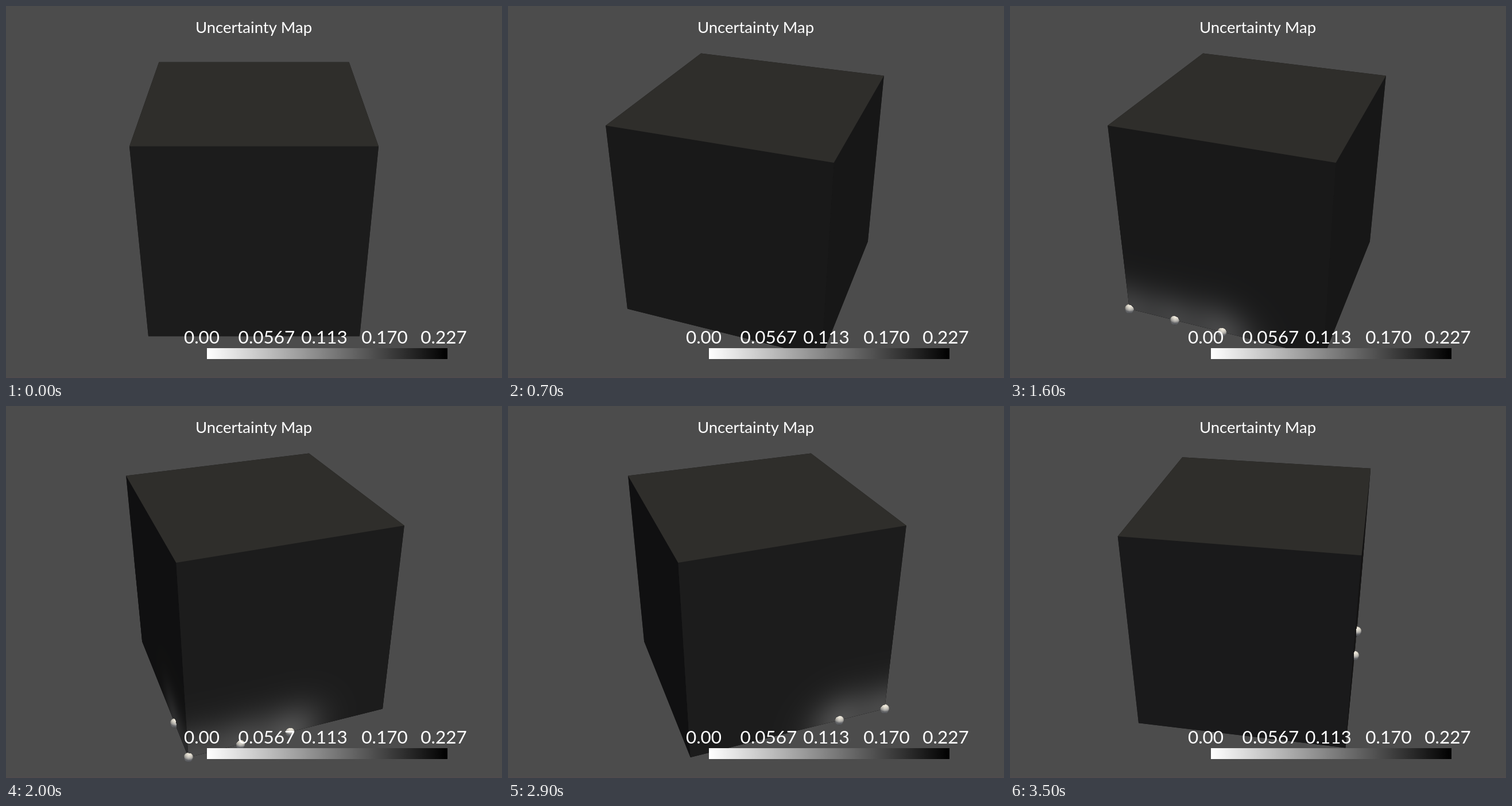
An HTML page with a canvas that plays this animation: 864x648 px, repeating every 3.6 s.

```html
<!DOCTYPE html>
<html lang="en">
<head>
<meta charset="utf-8">
<title>Uncertainty Map</title>
<style>
  html, body { margin: 0; width: 100%; height: 100%; overflow: hidden; background: #4c4c4c; }
  canvas { display: block; }
</style>
</head>
<body>
<canvas id="stage" width="864" height="648"></canvas>
<script>
const W = 864, H = 648, CX = W / 2, CY = H / 2;
const STEP = 100, STEPS = 36;
const RAD = Math.PI / 180;
const FOCAL = CY / Math.tan(15 * RAD);
const DIST = 6.938;
const SE = Math.sin(30 * RAD), CE = Math.cos(30 * RAD);
const CAM = [0, DIST * SE, DIST * CE];
const BASE = 55, BALL = 8.2;

const ctx = document.getElementById('stage').getContext('2d');
const buf = document.createElement('canvas');
const bufCtx = buf.getContext('2d');

const dot = (a, b) => a[0] * b[0] + a[1] * b[1] + a[2] * b[2];

// Light kit fixed to the camera: elevation, azimuth, strength, colour
const lights = [
  [50, 10, 0.75, [1, 0.9725, 0.902]],
  [-75, 0, 0.25, [0.9074, 0.9333, 1]],
  [0, 0, 0.25, [1, 1, 1]],
  [0, 110, 0.214, [1, 1, 1]],
  [0, -110, 0.214, [1, 1, 1]]
].map(([el, az, power, tint]) => ({
  dir: [Math.cos(el * RAD) * Math.sin(az * RAD), Math.sin(el * RAD),
        Math.cos(el * RAD) * Math.cos(az * RAD)],
  rgb: tint.map(c => c * power)
}));

// Sensors on the floor edges: x, z, weight of the bright patch
const sensors = [[1, -1, 0.38], [1, -0.5, 0.45], [0.5, -1, 0.4], [0, -1, 0.48]];

const faces = [[0, 0, 1], [1, 0, 0], [0, 0, -1], [-1, 0, 0], [0, 1, 0]].map(n => {
  const side = n[1] === 0;
  const u = side ? [n[2], 0, -n[0]] : [1, 0, 0];
  const v = side ? [0, 1, 0] : [0, 0, -1];
  const corners = [[-1, -1], [1, -1], [1, 1], [-1, 1]]
    .map(([a, b]) => n.map((c, i) => c + a * u[i] + b * v[i]));
  return { n, corners, glows: n[0] === 1 || n[2] === -1 };
});

function turn([x, y, z], cos, sin) {
  return [x * cos + z * sin, y, z * cos - x * sin];
}

// Stage axes to camera axes (right, up, toward the viewer)
function toView([x, y, z]) {
  return [x, y * CE - z * SE, y * SE + z * CE];
}

function project(p) {
  const [x, y, z] = toView(p);
  const k = FOCAL / (DIST - z);
  return [CX + x * k, CY - y * k, k];
}

function shade(n) {
  const sum = [0, 0, 0];
  for (const l of lights) {
    const k = Math.max(0, dot(n, l.dir));
    for (let i = 0; i < 3; i++) sum[i] += k * l.rgb[i];
  }
  return sum;
}

const css = (rgb, k) => `rgb(${rgb.map(c => Math.round(c * k)).join(',')})`;

function trace(pts) {
  pts.forEach(([x, y], i) => i ? ctx.lineTo(x, y) : ctx.moveTo(x, y));
  ctx.closePath();
}

function certainty(x, y, z) {
  let rest = 1;
  for (const [sx, sz, weight] of sensors) {
    const d2 = (x - sx) ** 2 + (y + 1) ** 2 + (z - sz) ** 2;
    rest *= 1 - weight * Math.exp(-d2 / 0.11);
  }
  return 1 - rest;
}

// Fills the current clip with the lit field on one upright face
function drawGlow(face, cos, sin) {
  const xs = face.pts.map(p => p[0]), ys = face.pts.map(p => p[1]);
  const x0 = Math.floor(Math.min(...xs)) - 1, y0 = Math.floor(Math.min(...ys)) - 1;
  const w = Math.ceil(Math.max(...xs)) + 1 - x0, h = Math.ceil(Math.max(...ys)) + 1 - y0;
  buf.width = w;
  buf.height = h;
  const img = bufCtx.createImageData(w, h);
  const gap = 1 - dot(face.normal, CAM);
  for (let j = 0, o = 0; j < h; j++) {
    const v = (CY - y0 - j - 0.5) / FOCAL;
    for (let i = 0; i < w; i++, o += 4) {
      const u = (x0 + i + 0.5 - CX) / FOCAL;
      const dy = v * CE - SE, dz = -v * SE - CE;
      const t = gap / (face.normal[0] * u + face.normal[2] * dz);
      const y = CAM[1] + t * dy;
      if (y > 0.1) continue;
      const X = t * u, Z = CAM[2] + t * dz;
      const level = BASE + 200 * certainty(X * cos - Z * sin, y, X * sin + Z * cos);
      for (let c = 0; c < 3; c++) img.data[o + c] = face.light[c] * level;
      img.data[o + 3] = 255;
    }
  }
  bufCtx.putImageData(img, 0, 0);
  ctx.drawImage(buf, x0, y0);
}

function drawCube(cos, sin) {
  const seen = [];
  for (const { n, corners, glows } of faces) {
    const normal = turn(n, cos, sin);
    if (dot(normal, CAM) <= 1) continue;
    seen.push({
      normal, glows,
      light: shade(toView(normal)),
      pts: corners.map(p => project(turn(p, cos, sin)))
    });
  }
  // One shared fill below keeps the inner seams closed
  ctx.beginPath();
  seen.forEach(f => trace(f.pts));
  ctx.fillStyle = '#1b1b1b';
  ctx.fill();
  for (const f of seen) {
    ctx.beginPath();
    trace(f.pts);
    ctx.fillStyle = css(f.light, BASE);
    ctx.fill();
    if (!f.glows) continue;
    ctx.save();
    ctx.clip();
    drawGlow(f, cos, sin);
    ctx.restore();
  }
}

// Does the cube stand between this point and the camera?
function hidden(p, cos, sin) {
  const a = turn(p, cos, -sin), b = turn(CAM, cos, -sin);
  let near = 0, far = 1;
  for (let i = 0; i < 3; i++) {
    const d = b[i] - a[i] || 1e-9;
    const t1 = (-1 - a[i]) / d, t2 = (1 - a[i]) / d;
    near = Math.max(near, Math.min(t1, t2));
    far = Math.min(far, Math.max(t1, t2));
  }
  return far > near;
}

function drawBall(x, z, cos, sin) {
  const c = turn([x, -1, z], cos, sin);
  const [px, py, k] = project(c);
  const size = 22, x0 = Math.floor(px) - 11, y0 = Math.floor(py) - 11;
  buf.width = buf.height = size;
  const img = bufCtx.createImageData(size, size);
  for (let j = 0, o = 0; j < size; j++) {
    for (let i = 0; i < size; i++, o += 4) {
      const a = (x0 + i + 0.5 - px) / BALL, b = (py - y0 - j - 0.5) / BALL;
      const r = Math.hypot(a, b);
      const cover = Math.min(1, (1 - r) * BALL + 0.5);
      if (cover <= 0) continue;
      const d = Math.sqrt(Math.max(0, 1 - r * r)), R = BALL / k;
      const p = [c[0] + R * a, c[1] + R * (b * CE + d * SE), c[2] + R * (d * CE - b * SE)];
      if (hidden(p, cos, sin)) continue;
      const light = shade([a, b, d]);
      for (let n = 0; n < 3; n++) img.data[o + n] = 255 * light[n];
      img.data[o + 3] = 255 * cover;
    }
  }
  bufCtx.putImageData(img, 0, 0);
  ctx.drawImage(buf, x0, y0);
}

function drawLabels() {
  const ramp = ctx.createLinearGradient(350, 0, 769, 0);
  ramp.addColorStop(0, '#fff');
  ramp.addColorStop(1, '#000');
  ctx.fillStyle = ramp;
  ctx.fillRect(350, 596, 419, 19);

  ctx.fillStyle = '#fff';
  ctx.textAlign = 'center';
  ctx.font = '27.5px Lato, "Liberation Sans", sans-serif';
  ctx.fillText('Uncertainty Map', 431.5, 47);
  ctx.font = '31.5px Lato, "Liberation Sans", sans-serif';
  [['0.00', 341], ['0.0567', 454], ['0.113', 554.5], ['0.170', 659.5], ['0.227', 762.5]]
    .forEach(([text, x]) => ctx.fillText(text, x, 588));
}

function draw(step) {
  const angle = step * 2 * Math.PI / STEPS;
  const cos = Math.cos(angle), sin = Math.sin(angle);
  ctx.fillStyle = '#4c4c4c';
  ctx.fillRect(0, 0, W, H);
  ctx.fillStyle = '#504b4d';
  ctx.fillRect(0, 646, W, 2);
  drawCube(cos, sin);
  for (const [x, z] of sensors) drawBall(x, z, cos, sin);
  drawLabels();
}

const start = performance.now();
let last = -1;
function tick() {
  const step = Math.floor((performance.now() - start) / STEP) % STEPS;
  if (step !== last) draw(last = step);
  requestAnimationFrame(tick);
}
tick();
</script>
</body>
</html>
```
